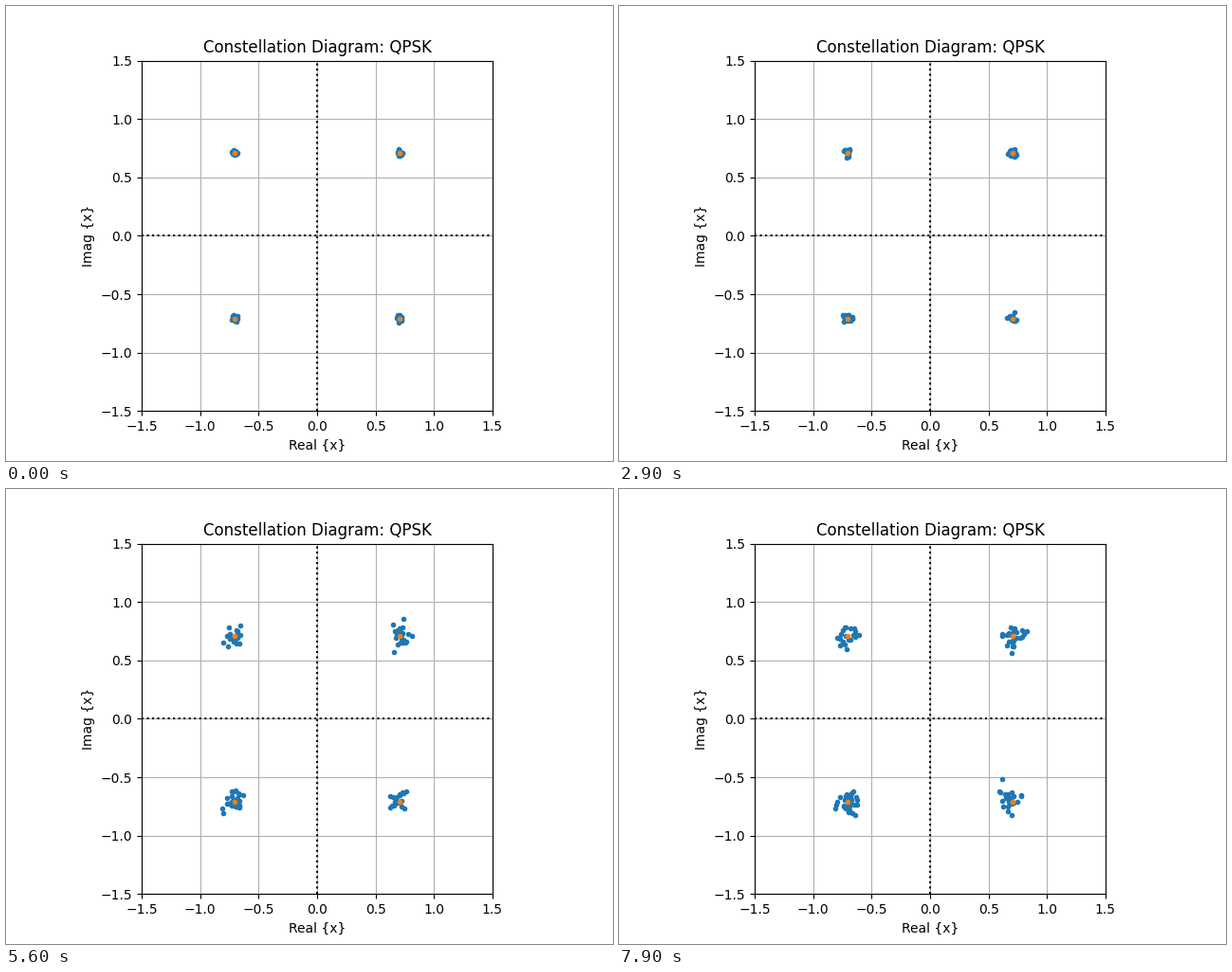
A matplotlib script for the animation above (8000 ms loop, 640 by 480 pixels).

```python
import matplotlib.pyplot as plt
import numpy as np
from matplotlib.animation import FuncAnimation

FRAMES, INTERVAL = 80, 100
BLUE, ORANGE = "#1f77b4", "#ff7f0e"

IDEAL = np.array([-1 + 1j, 1 + 1j, -1 - 1j, 1 - 1j]) / np.sqrt(2)
SYMBOLS = np.repeat(IDEAL, [22, 23, 34, 21])

# Intersymbol interference at each sampling phase of a symbol
SPREAD = [0, .055, .05, .8, .006, .013]
CLOSED = 3  # phase halfway between symbols, where the eye is closed
JITTER = .012


def noise(seed, sigma):
    rng = np.random.default_rng(seed)
    re, im = rng.normal(0, sigma, (2, len(SYMBOLS)))
    return re + 1j * im


def samples(n):
    phase = n % len(SPREAD)
    if phase == CLOSED:
        return noise(n, SPREAD[phase])
    # The interference repeats every cycle, the jitter is always new
    return SYMBOLS + noise(40 + phase, SPREAD[phase]) + noise(100 + n, JITTER)


fig, ax = plt.subplots(figsize=(6.4, 4.8), dpi=100)
ax.axhline(0, color="k", ls=":")
ax.axvline(0, color="k", ls=":")
received = ax.scatter([], [], marker=".", color=BLUE)
ax.scatter(IDEAL.real, IDEAL.imag, marker=".", color=ORANGE)
ticks = np.linspace(-1.5, 1.5, 7)
ax.set(xlim=(-1.5, 1.5), ylim=(-1.5, 1.5), xticks=ticks, yticks=ticks,
       aspect="equal", xlabel="Real {x}", ylabel="Imag {x}",
       title="Constellation Diagram: QPSK")
ax.grid(True)
ax.set_axisbelow(True)


def update(n):
    x = samples(n)
    received.set_offsets(np.column_stack([x.real, x.imag]))
    return received,


anim = FuncAnimation(fig, update, frames=FRAMES, interval=INTERVAL,
                     repeat=True, repeat_delay=0)
plt.show()
```
